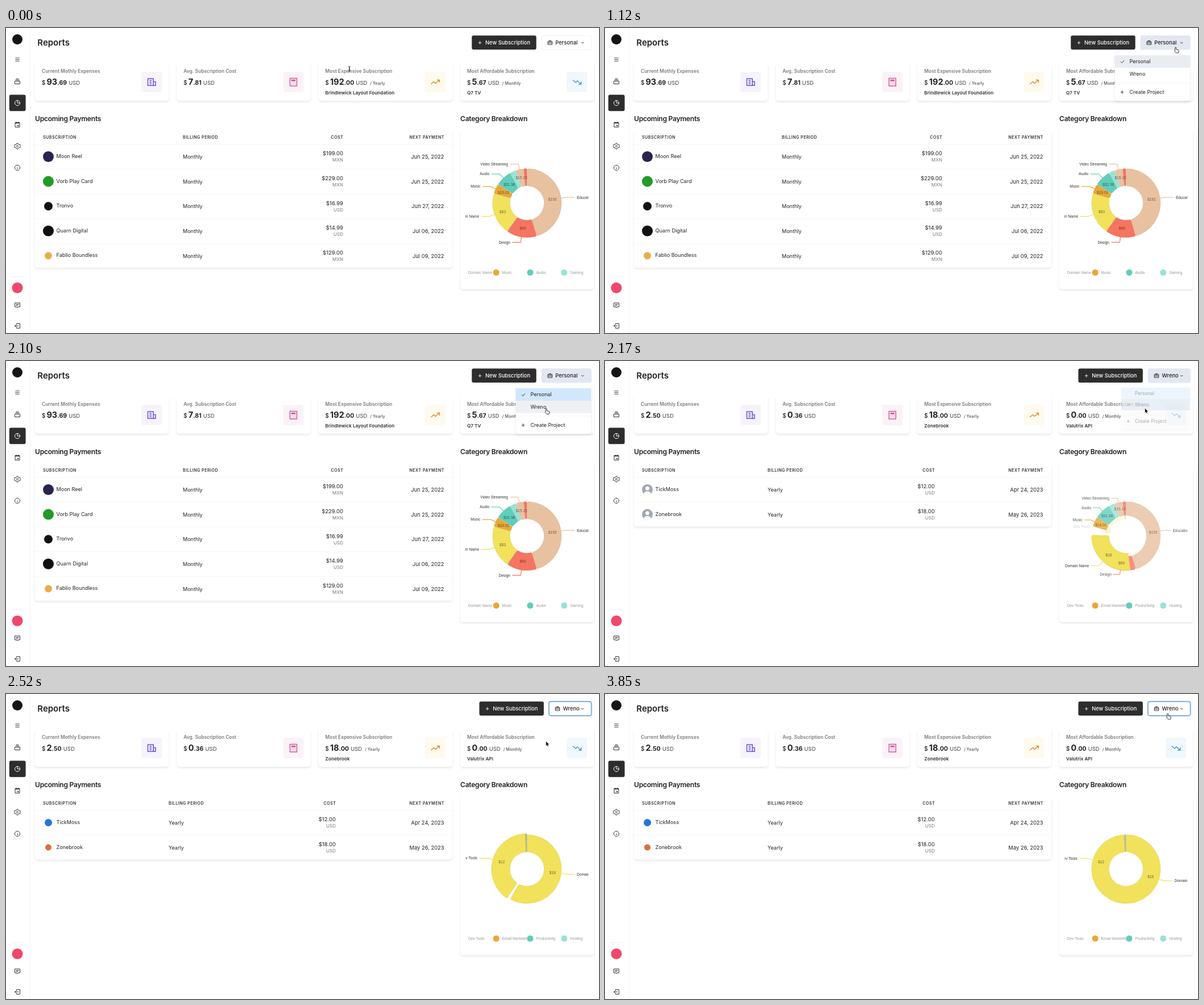
Write an HTML page with a canvas that moves like this. It is 1043x537 px and loops after 3920 ms.

```html
<!DOCTYPE html>
<html lang="en">
<head>
<meta charset="utf-8">
<title>Reports</title>
<style>
html, body { margin: 0; width: 100%; height: 100%; overflow: hidden; background: #fff; }
canvas { display: block; width: 100vw; height: 100vh; }
</style>
</head>
<body>
<canvas id="stage"></canvas>
<script>
const W = 1043, H = 537, LOOP = 3920, STEP = 70;
const OPEN = 900, SWAP = 2102, LOGOS = 2300, FOCUS = 2230;
const UI = 'Inter, sans-serif', CHART = '"Liberation Sans", Arial, sans-serif';
const INK = '#2d2d2d';
const canvas = document.getElementById('stage');
const ctx = canvas.getContext('2d');
let scale = 1;

function resize() {
  canvas.width = Math.round(innerWidth * devicePixelRatio);
  canvas.height = Math.round(innerHeight * devicePixelRatio);
  scale = canvas.width / W;
}
addEventListener('resize', resize);
resize();

const clamp = v => Math.max(0, Math.min(1, v));
const ease = v => v * v * (3 - 2 * v);
const phase = (t, a, b) => clamp((t - a) / (b - a));

// Damped spring: tension 120, friction 14
function spring(ms) {
  if (ms <= 0) return 0;
  const s = ms / 1000, w = Math.sqrt(120 - 49);
  return 1 - Math.exp(-7 * s) * (Math.cos(w * s) + 7 / w * Math.sin(w * s));
}

function text(str, x, y, size, { weight = 400, color = '#222', align = 'left', font = UI, gap = 0 } = {}) {
  ctx.font = `${weight} ${size}px ${font}`;
  ctx.letterSpacing = gap + 'px';
  ctx.textAlign = align;
  ctx.fillStyle = color;
  ctx.fillText(str, x, y);
  return x + ctx.measureText(str).width;
}

function box(x, y, w, h, r, fill, stroke, line = 1) {
  ctx.beginPath();
  ctx.roundRect(x, y, w, h, r);
  if (fill) { ctx.fillStyle = fill; ctx.fill(); }
  if (stroke) { ctx.strokeStyle = stroke; ctx.lineWidth = line; ctx.stroke(); }
}

function dot(x, y, r, color) {
  ctx.beginPath();
  ctx.arc(x, y, r, 0, 7);
  ctx.fillStyle = color;
  ctx.fill();
}

// The shadow is cast by a slightly smaller box, so it shows mostly below
function shadowBox(x, y, w, h, blur = 4) {
  ctx.save();
  ctx.shadowColor = 'rgba(0,0,0,.13)';
  ctx.shadowBlur = blur * scale;
  ctx.shadowOffsetY = 2 * scale;
  box(x + 0.7, y + 0.7, w - 1.4, h - 1.4, 4, '#fff');
  ctx.restore();
  box(x, y, w, h, 5, '#fff');
}

const RING = 'M12 3a9 9 0 1 0 .01 0z';
const ICONS = {
  menu: 'M4 6H20M4 12H20M4 18H20',
  stack: 'M3 11h18v10H3zM5 7h14M7 3h10',
  pie: RING + 'M12 3V12H21',
  calendar: 'M4 5h16v16H4zM4 7h16M8 2v4M16 2v4M13 14h3v3h-3z',
  gear: 'M10 2h4l1 3 3 2 3-1 2 3.5-2 2.5 2 2.5-2 3.5-3-1-3 2-1 3h-4l-1-3-3-2-3 1-2-3.5 2-2.5-2-2.5 2-3.5 3 1 3-2zM12 9a3 3 0 1 0 .01 0z',
  info: RING + 'M12 11v6M12 7v1',
  message: 'M3 4h18v14h-7l-2 3-2-3H3zM7 9h10M7 13h7',
  exit: 'M9 8V4h12v16H9v-4M16 12H3M7 8l-4 4 4 4',
  news: 'M3 4h13v16H3zM16 11h5v9h-5M7 8h5M7 12h5M7 16h5',
  calc: 'M4 3h16v18H4zM8 7h8v2H8zM8 13h1M12 13h1M16 13h1M8 17h1M12 17h1M16 17h1',
  up: 'M2 17l7-6 4 4 9-8M16 7h6v6',
  down: 'M2 7l7 6 4-4 9 8M16 17h6v-6',
  bag: 'M3 7h18v13H3zM8 7V4h8v3M3 13h18M12 12v3',
  chevron: 'M6 9l6 6 6-6',
  check: 'M4 12l6 6L20 6',
  plus: 'M12 4v16M4 12h16'
};
for (const key in ICONS) ICONS[key] = new Path2D(ICONS[key]);

function icon(name, x, y, size, color = '#333', line = 2) {
  ctx.save();
  ctx.translate(x - size / 2, y - size / 2);
  ctx.scale(size / 24, size / 24);
  ctx.strokeStyle = color;
  ctx.lineWidth = line;
  ctx.stroke(ICONS[name]);
  ctx.restore();
}

const PERSONAL = {
  name: 'Personal', shift: 0, periodX: 311, costX: 593,
  cards: [['93', '.69'], ['7', '.81'], ['192', '.00', 'Yearly', 'Brindlewick Layout Foundation'], ['5', '.67', 'Monthly', 'Q7 TV']],
  rows: [
    ['Moon Reel', 'Monthly', '$199.00', 'MXN', 'Jun 25, 2022', '#2b2350', 9.5],
    ['Vorb Play Card', 'Monthly', '$229.00', 'MXN', 'Jun 25, 2022', '#239a26', 9.5],
    ['Tronvo', 'Monthly', '$16.99', 'USD', 'Jun 27, 2022', '#111', 7.5],
    ['Quarn Digital', 'Monthly', '$14.99', 'USD', 'Jul 06, 2022', '#111', 9.5],
    ['Fablio Boundless', 'Monthly', '$129.00', 'MXN', 'Jul 09, 2022', '#e9ae4b', 6.5]
  ],
  legend: ['Domain Name', 'Music', 'Audio', 'Gaming']
};
const TEAM = {
  name: 'Wreno', shift: 13.2, periodX: 286, costX: 580,
  cards: [['2', '.50'], ['0', '.36'], ['18', '.00', 'Yearly', 'Zonebrook'], ['0', '.00', 'Monthly', 'Valutrix API']],
  rows: [
    ['TickMoss', 'Yearly', '$12.00', 'USD', 'Apr 24, 2023', '#2474d8', 6.5],
    ['Zonebrook', 'Yearly', '$18.00', 'USD', 'May 26, 2023', '#d9703a', 5.5]
  ],
  legend: ['Dev Tools', 'Email Marketing', 'Productivity', 'Hosting']
};

function sidebar() {
  ctx.fillStyle = '#f4f4f4';
  ctx.fillRect(42, 0, 1, H);
  dot(20, 20, 9, '#151515');
  box(5.8, 117.4, 28.8, 28.8, 3, INK);
  [['menu', 55.5], ['stack', 94], ['pie', 132], ['calendar', 170], ['gear', 208], ['info', 246], ['message', 488], ['exit', 524.5]]
    .forEach(([name, y]) => icon(name, 20, y, name === 'menu' ? 11 : 12, name === 'pie' ? '#fff' : '#333'));
  ctx.fillStyle = '#eee';
  ctx.fillRect(9, 437.5, 22, 1);
  dot(20, 457.5, 9.5, '#f0476c');
}

const CARDS = [
  [51, 'Current Mothly Expenses', 'news', '#6a4fd6', '#f7f3fd'],
  [300.3, 'Avg. Subscription Cost', 'calc', '#d4589c', '#fbf2f8'],
  [549.6, 'Most Expensive Subscription', 'up', '#e58e35', '#fffaee'],
  [799, 'Most Affordable Subscription', 'down', '#4698dc', '#f0f7fd']
];

function cards(view) {
  ctx.save();
  ctx.beginPath();
  ctx.rect(43, 66, W, H);
  ctx.clip();
  CARDS.forEach(([x]) => shadowBox(x, 56, 235.3, 72.2));
  ctx.restore();
  CARDS.forEach(([x, label, name, color, tint], i) => {
    const [whole, cents, period, owner] = view.cards[i], left = x + 12;
    text(label, left, 79, 8.4, { weight: 600, color: '#7b7b7b' });
    text('$', left, 100, 9.8, { weight: 500 });
    let end = text(whole, left + 8.4, 100, 14.5, { weight: 700 });
    end = text(cents, end, 100, 10.6, { weight: 700 });
    end = text('USD', end + 3, 100, 9.5, { color: '#444' });
    if (period) {
      text('/ ' + period, end + 5, 100, 7.24, { weight: 500, color: '#555' });
      text(owner, left, 116.7, 8.2, { weight: 600, color: '#333' });
    }
    box(x + 187.2, 77, 36, 36, 4, tint);
    icon(name, x + 205.2, 95.2, 18, color, 2);
  });
}

function blankAvatar(x, y) {
  ctx.save();
  dot(x, y, 9.5, '#a2a8b1');
  ctx.clip();
  dot(x, y - 2.3, 3.4, '#fff');
  ctx.beginPath();
  ctx.ellipse(x, y + 7.6, 6.2, 4.8, 0, 0, 7);
  ctx.fill();
  ctx.restore();
}

function table(view, t) {
  text('Upcoming Payments', 51, 163.7, 12.07, { weight: 600, gap: -0.25 });
  shadowBox(51, 180, 734, 24.2 + view.rows.length * 43.6);
  const head = { weight: 600, color: '#333', gap: 0.5 }, right = { ...head, align: 'right' };
  text('SUBSCRIPTION', 65, 195.1, 7.1, head);
  text('BILLING PERIOD', view.periodX, 195.1, 7.1, head);
  text('COST', view.costX + 0.5, 195.1, 7.1, right);
  text('NEXT PAYMENT', 771, 195.1, 7.1, right);
  view.rows.forEach(([name, period, cost, unit, date, color, r], i) => {
    const y = 226.5 + i * 43.6;
    ctx.fillStyle = '#f6f6f6';
    ctx.fillRect(51, y - 22, 734, 0.8);
    if (view === TEAM && t < LOGOS) blankAvatar(74.5, y);
    else dot(74.5, y, r, color);
    text(name, 88.6, y + 2.5, 9.06);
    text(period, view.periodX, y + 3.7, 9.06);
    text(cost, view.costX, y - 2.2, 9.5, { align: 'right' });
    text(unit, view.costX, y + 8.9, 8.1, { align: 'right', color: '#777' });
    text(date, 770.5, y + 3.7, 9.35, { align: 'right' });
  });
}

// Donut chart
const CX = 916.4, CY = 308.2, R = 60.5, HOLE = 30.2, TINY = 6.64, RAD = Math.PI / 180, PAD = 0.7 * RAD;
const PALETTE = [[232, 193, 160], [244, 117, 96], [241, 225, 91], [232, 168, 56], [97, 205, 187], [151, 227, 213]];
const rgb = (c, dark = 0) => `rgb(${c.map(v => Math.round(v * 0.7 ** dark))})`;

function layout(items, firstColor) {
  const sum = items.reduce((s, [, v]) => s + v, 0);
  const unit = (2 * Math.PI - items.length * PAD) / sum;
  let a = 0;
  return items.map(([name, value], i) => {
    const a0 = a;
    a += value * unit + PAD;
    return { name, value, a0, a1: a, color: PALETTE[(firstColor + i) % 6] };
  });
}

const before = layout([['Education', 192], ['Design', 60], ['Domain Name', 83], ['Music', 19.01], ['Audio', 31.98], ['Gaming', 10.9], ['Video Streaming', 15.15], ['Other', 6]], 0);
const after = layout([['Domain Name', 18], ['Dev Tools', 12], ['Email Marketing', 0], ['Productivity', 0], ['Hosting', 0], ['Other', 0]], 7);
after[0].color = PALETTE[2];

function slices(p) {
  const base = { r0: HOLE, r1: R, alpha: 1, reach: 1 };
  if (p === 0) return before.map(s => ({ ...s, ...base }));
  const mix = (a, b) => a + (b - a) * p;
  const old = before[2], kept = after[0];
  const leaving = before.filter(s => s !== old)
    .map(s => ({ ...s, ...base, r0: mix(HOLE, R), alpha: 1 - p, reach: 1 - p }));
  const entering = after.slice(1)
    .map(s => ({ ...s, ...base, r1: mix(HOLE, R), alpha: p, reach: p }));
  return [...leaving, { ...kept, ...base, a0: mix(old.a0, kept.a0), a1: mix(old.a1, kept.a1) }, ...entering]
    .filter(s => s.alpha > 0.004);
}

const at = (r, a) => [CX + r * Math.sin(a), CY - r * Math.cos(a)];

function sector({ a0, a1, r0, r1, color, alpha }) {
  const inset = PAD / 2 * Math.hypot(HOLE, R), top = -Math.PI / 2;
  const edge = r => Math.min(inset / r, (a1 - a0) / 2);
  const o0 = a0 + edge(r1), o1 = a1 - edge(r1), i0 = a0 + edge(r0), i1 = a1 - edge(r0);
  const c = Math.max(0, Math.min(1.8, (r1 - r0) / 2, (i1 - i0) * r0 / 2));
  ctx.globalAlpha = Math.min(1, alpha);
  ctx.beginPath();
  ctx.moveTo(...at(r0 + c, i0));
  ctx.lineTo(...at(r1 - c, o0));
  ctx.quadraticCurveTo(...at(r1, o0), ...at(r1, o0 + c / r1));
  ctx.arc(CX, CY, r1, o0 + c / r1 + top, Math.max(o0 + c / r1, o1 - c / r1) + top);
  ctx.quadraticCurveTo(...at(r1, o1), ...at(r1 - c, o1));
  ctx.lineTo(...at(r0 + c, i1));
  ctx.quadraticCurveTo(...at(r0, i1), ...at(r0, i1 - c / r0));
  ctx.arc(CX, CY, r0, i1 - c / r0 + top, Math.min(i1 - c / r0, i0 + c / r0) + top, true);
  ctx.quadraticCurveTo(...at(r0, i0), ...at(r0 + c, i0));
  ctx.closePath();
  ctx.fillStyle = rgb(color);
  ctx.fill();
  ctx.strokeStyle = rgb(color, 0.2);
  ctx.lineWidth = 0.6;
  ctx.stroke();
}

function linkLabel({ name, a0, a1, color, alpha, reach }) {
  const mid = (a0 + a1) / 2, side = Math.sin(mid) < 0 ? -1 : 1;
  const [x, y] = at(R + 9.66 * reach, mid), end = x + side * 14.5 * reach;
  ctx.globalAlpha = Math.min(1, alpha);
  ctx.beginPath();
  ctx.moveTo(...at(R, mid));
  ctx.lineTo(x, y);
  ctx.lineTo(end, y);
  ctx.strokeStyle = rgb(color);
  ctx.lineWidth = 1.2;
  ctx.stroke();
  text(name, end + side * 3.6 * reach, y + 2.4, TINY, { font: CHART, color: '#333', align: side < 0 ? 'right' : 'left' });
}

function valueLabel({ value, a0, a1, r0, r1, color, alpha }) {
  const [x, y] = at((r0 + r1) / 2, (a0 + a1) / 2);
  ctx.globalAlpha = Math.min(1, alpha);
  text('$' + value, x, y + 2.4, TINY, { font: CHART, color: rgb(color, 2), align: 'center' });
}

function chart(view, t) {
  text('Category Breakdown', 799, 163.7, 12.07, { weight: 600, gap: -0.25 });
  shadowBox(799, 180, 235.3, 279.7);
  const list = slices(t < SWAP ? 0 : spring(t - SWAP));
  const labelled = list.filter(s => s.a1 - s.a0 > 10 * RAD);
  ctx.save();
  ctx.beginPath();
  ctx.rect(808.2, 190, 216.2, 260);
  ctx.clip();
  list.forEach(sector);
  labelled.forEach(linkLabel);
  labelled.forEach(valueLabel);
  ctx.globalAlpha = 1;
  view.legend.forEach((name, i) => {
    const x = CX + (i - 2) * 59.8;
    if (i) dot(x + 5.6, 430.5, 5.5, rgb(PALETTE[i + 2]));
    text(name, x + 16, 432.9, TINY, { font: CHART, color: '#999' });
  });
  ctx.restore();
}

function header(view, t, hover) {
  text('Reports', 55.3, 31.2, 15, { weight: 600 });
  const d = view.shift, focus = t >= FOCUS;
  box(819.3 + d, 13.3, 113.4, 24.8, 3, INK);
  icon('plus', 833.5 + d, 26, 8.5, '#fff', 2.4);
  text('New Subscription', 843 + d, 29.4, 9.35, { weight: 500, color: '#fff' });
  if (focus) box(954.9, 13.2, 74.8, 25, 3.5, '#fff', '#78ace3', 1.9);
  else box(942 + d, 13.5, 87.4 - d, 24.5, 3, hover ? '#e3e7f1' : '#fff', hover ? '#e3e7f1' : '#eeeff1', 0.8);
  icon('bag', 956.8 + d, 25.8, 10, '#222', 2.3);
  text(view.name, 966.3 + d, 29.4, 9.35, { weight: 500 });
  icon('chevron', 1014.2, 26, 8.5, '#222', 2.6);
}

function menu(view, t, y) {
  const shown = t < SWAP ? ease(phase(t, OPEN, OPEN + 150)) : 1 - phase(t, SWAP, SWAP + 108);
  if (!shown) return;
  const team = view === TEAM, zoom = 1 - 0.143 * (1 - shown);
  ctx.save();
  ctx.globalAlpha = shown;
  ctx.translate(1029, 37.5);
  ctx.scale(zoom, zoom);
  ctx.translate(-1029, -37.5);
  shadowBox(896.5, 43, 132.5, 85.5, 5);
  ctx.fillStyle = y > 48 ? '#d0e7fd' : '#e9edf2';
  ctx.fillRect(896.5, 48, 132.5, 22);
  if (y > 70) {
    ctx.fillStyle = team ? '#c5d9ea' : '#eef0f3';
    ctx.fillRect(896.5, 70, 132.5, 21.7);
  }
  icon('check', 910, team ? 81 : 59.3, 9, '#222', 2.4);
  text('Personal', 922.4, 62.3, 9.06);
  text('Wreno', 922.4, 84.2, 9.06);
  ctx.fillStyle = '#f3f3f3';
  ctx.fillRect(896.5, 96.5, 132.5, 0.8);
  icon('plus', 909.6, 113, 9, '#222', 2.2);
  text('Create Project', 922.4, 116.3, 9.06);
  ctx.restore();
}

const HAND = new Path2D('M0 1a1 1 0 0 1 2 0V4l3.6 .8q1.2 .3 1 1.6L6 10H2L-1 6.8q.3-1.2 1-.6z');
const ARROW = new Path2D('M0 0v7.5l1.8-1.6 1.2 2.7 1.2-.5-1.2-2.6h2.4z');
const IBEAM = new Path2D('M-1.8-4.5Q0-4.5 0-3.2V3.2Q0 4.5-1.8 4.5M1.8-4.5Q0-4.5 0-3.2V3.2Q0 4.5 1.8 4.5M-1 1h2');

function pointer(t) {
  const go = (a, b, x0, y0, x1, y1) => {
    const k = ease(phase(t, a, b));
    return [x0 + (x1 - x0) * k, y0 + (y1 - y0) * k];
  };
  if (t < 1120) return go(0, 770, 604, 72, 1002.6, 33.8);
  if (t < SWAP) return go(1120, 1540, 1002.6, 33.8, 949.2, 83.6);
  return go(3430, 3850, 949.8, 83.6, 988.6, 34.4);
}

function cursor(t, x, y, hover) {
  ctx.save();
  ctx.translate(x, y);
  ctx.lineJoin = 'round';
  if (t < 70) {
    ctx.strokeStyle = '#222';
    ctx.lineWidth = 0.9;
    ctx.stroke(IBEAM);
  } else if (hover || (t > OPEN && t < SWAP)) {
    ctx.fillStyle = '#fff';
    ctx.fill(HAND);
    ctx.strokeStyle = '#222';
    ctx.lineWidth = 0.9;
    ctx.stroke(HAND);
  } else {
    ctx.strokeStyle = '#fff';
    ctx.lineWidth = 1.2;
    ctx.stroke(ARROW);
    ctx.fillStyle = '#111';
    ctx.fill(ARROW);
  }
  ctx.restore();
}

function draw(t) {
  const view = t < SWAP ? PERSONAL : TEAM;
  const [x, y] = pointer(t);
  const hover = x > 942 + view.shift && y < 38;
  ctx.setTransform(scale, 0, 0, canvas.height / H, 0, 0);
  ctx.globalAlpha = 1;
  ctx.fillStyle = '#fff';
  ctx.fillRect(0, 0, W, H);
  sidebar();
  cards(view);
  table(view, t);
  chart(view, t);
  header(view, t, hover || (t > OPEN && t < FOCUS));
  menu(view, t, y);
  cursor(t, x, y, hover);
}

const start = performance.now();
function tick() {
  const t = (performance.now() - start) % LOOP;
  draw(Math.floor(t / STEP) * STEP);
  requestAnimationFrame(tick);
}
tick();
</script>
</body>
</html>
```
